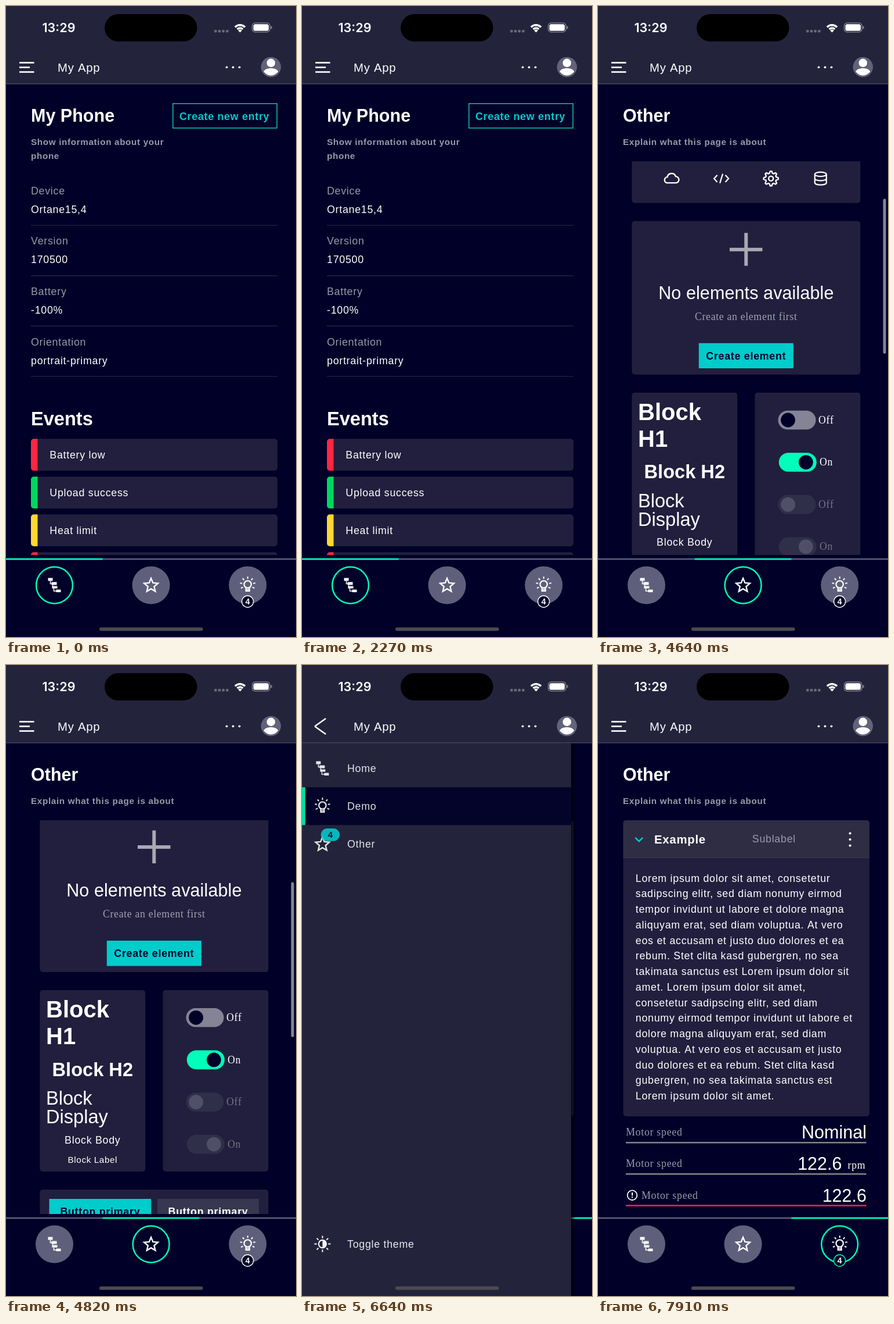
Recreate the animation shown at these times as an HTML page with a canvas. Size 500 by 1085 pixels, loop 8000 ms.

```html
<!DOCTYPE html>
<html lang="en">
<head>
<meta charset="utf-8">
<title>My App</title>
<style>
html, body { margin: 0; width: 100%; height: 100%; overflow: hidden; background: #000028; }
canvas { display: block; width: 100vw; height: 100vh; }
</style>
</head>
<body>
<canvas id="stage"></canvas>
<script>
const W = 500, H = 1085, LOOP = 8000, FPS = 11;
const canvas = document.getElementById('stage');
const ctx = canvas.getContext('2d');
const dpr = window.devicePixelRatio || 1;
canvas.width = W * dpr;
canvas.height = H * dpr;

const SANS = '"Liberation Sans", Arial, sans-serif';
const SERIF = '"Liberation Serif", "Times New Roman", serif';
const BG = '#000028', BAR = '#23233c', CARD = '#211f3d', WHITE = '#fff', SOFT = '#9999a9';
const TEAL = '#00ffb9', CYAN = '#00cccc', RED = '#ff2640', GREY = '#5f5f7b';
const BODY = 17.82, SMALL = 15.27, LARGE = 20.36, TITLE = 30.53;

// ---------- helpers ----------
const clamp = v => Math.min(1, Math.max(0, v));
const ramp = (v, a, b) => clamp((v - a) / (b - a));
const smooth = p => p * p * (3 - 2 * p);
const easeOut = p => 1 - (1 - p) ** 3;
const mix = (a, b, p) => a + (b - a) * p;

function rect(x, y, w, h, color, r = 0) {
  ctx.fillStyle = color;
  ctx.beginPath();
  ctx.roundRect(x, y, w, h, r);
  ctx.fill();
}

function disc(x, y, r, fill, stroke, width = 2) {
  ctx.beginPath();
  ctx.arc(x, y, r, 0, 7);
  if (fill) { ctx.fillStyle = fill; ctx.fill(); }
  if (stroke) { ctx.strokeStyle = stroke; ctx.lineWidth = width; ctx.stroke(); }
}

function line(x1, y1, x2, y2, color = WHITE, width = 2.6) {
  ctx.strokeStyle = color;
  ctx.lineWidth = width;
  ctx.beginPath();
  ctx.moveTo(x1, y1);
  ctx.lineTo(x2, y2);
  ctx.stroke();
}

function text(str, x, y, { size = BODY, color = WHITE, weight = 400, align = 'left', font = SANS, gap = 0.73 } = {}) {
  ctx.font = `${weight} ${size}px ${font}`;
  ctx.letterSpacing = gap + 'px';
  ctx.textAlign = align;
  ctx.fillStyle = color;
  ctx.fillText(str, x, y);
}

function at(x, y, draw) {
  ctx.save();
  ctx.translate(x, y);
  draw();
  ctx.restore();
}

function clipTo(x, y, w, h, draw) {
  ctx.save();
  ctx.beginPath();
  ctx.rect(x, y, w, h);
  ctx.clip();
  draw();
  ctx.restore();
}

function faded(alpha, draw) {
  if (alpha <= 0) return;
  ctx.save();
  ctx.globalAlpha *= alpha;
  draw();
  ctx.restore();
}

// ---------- icons, centred on 0,0 ----------
function stroke(d, width = 2.4, color = WHITE) {
  ctx.strokeStyle = color;
  ctx.lineWidth = width;
  ctx.stroke(new Path2D(d));
}

function fill(d, color = WHITE) {
  ctx.fillStyle = color;
  ctx.fill(new Path2D(d));
}

function rays(first, last, step, r1, r2) {
  for (let a = first; a <= last; a += step) {
    const c = Math.cos(a * Math.PI / 180), s = Math.sin(a * Math.PI / 180);
    line(c * r1, s * r1, c * r2, s * r2, WHITE, 2);
  }
}

function polygon(n, radius, turn = -Math.PI / 2) {
  ctx.beginPath();
  for (let i = 0; i < n; i++) {
    const a = turn + i * 2 * Math.PI / n, r = radius(i);
    ctx.lineTo(r * Math.cos(a), r * Math.sin(a));
  }
  ctx.closePath();
  ctx.strokeStyle = WHITE;
  ctx.lineWidth = 2.4;
  ctx.stroke();
}

const icons = {
  tree() {
    fill('M-11-12h8v5h-8zM-5-5h9v5h-9zM-4 2h9v4h-9zM3 8h8v4.5h-8z');
    stroke('M-7-7v5h3M-3 0v4M-1 6v4.5h5', 1.5);
  },
  star() { at(0, 1, () => polygon(10, i => i % 2 ? 5.6 : 12.4)); },
  bulb() {
    at(0, -1, () => { disc(0, 0, 6.2, null, WHITE, 2.3); rays(-210, 30, 40, 9.6, 13.4); });
    stroke('M-3 4.5v6h6v-6M-3 8h6', 2.2);
  },
  theme() {
    disc(0, 0, 6.6, null, WHITE, 2.2);
    fill('M0-6.6A6.6 6.6 0 0 1 0 6.6z');
    rays(0, 315, 45, 9.8, 14);
  },
  menu() { stroke('M-13.5-8.5h27M-13.5 0h18M-13.5 8.5h27'); },
  rocket() {
    stroke('M-5 2Q-1-9 11-10Q10 1-2 6zM-4-3l-6 1 3-6 7-1M3 3l0 7-6 3 0-7', 2);
    disc(4, -4, 2.2, WHITE);
    stroke('M-6 5l-6 6M-9 3l-3 3M-4 8l-3 4', 1.8);
  },
  calendar() {
    stroke('M-11-10.5h22v21h-22z');
    stroke('M-11-5.5h22', 3);
    stroke('M-6.5 1h13M-6.5 6h13', 2.6);
    stroke('M-3.3-1v9M3.3-1v9', 2, CARD);
  },
  layout() {
    stroke('M3-10.5h-14v21h22v-12h-22M0-10.5v21');
    stroke('M5.5-10.5h5.5v5h-5.5z');
  },
  store() {
    stroke('M-9-12q-7 9 3 12M-6-5v5h-5', 2);
    at(6, 4, () => icons.stack(7, 9));
  },
  bars() { for (let x = -12; x <= 12; x += 4) line(x, -11, x, 11, WHITE, 2); },
  battery() {
    stroke('M-12.5-7.5h23v15h-23z');
    fill('M-9.5-4.5h17v9h-17zM11-3.5h3v7h-3z');
  },
  clock() {
    disc(0, 0, 12.5, null, WHITE, 2.4);
    stroke('M0-7.5v8l4 4.5');
  },
  cloud() { stroke('M-7 7.5a5 5 0 0 1-.5-10a7.5 7.5 0 0 1 14.5-1a5.5 5.5 0 0 1 0 11z'); },
  code() { stroke('M-7-6l-5.5 6 5.5 6M7-6l5.5 6-5.5 6M2.5-8l-5 16', 2.2); },
  gear() {
    polygon(32, i => i % 4 < 2 ? 12.6 : 9.4, -Math.PI / 2 - Math.PI / 32);
    disc(0, 0, 4, null, WHITE, 2.4);
  },
  stack(w = 10, h = 11) {
    const k = h / 3;
    stroke(`M${-w} ${-h + k}a${w} ${k} 0 0 1 ${2 * w} 0a${w} ${k} 0 0 1 ${-2 * w} 0v${2 * h - 2 * k}a${w} ${k} 0 0 0 ${2 * w} 0v${-2 * h + 2 * k}M${-w} 0a${w} ${k} 0 0 0 ${2 * w} 0`, 2.2);
  }
};
const icon = (name, x, y) => at(x, y, () => icons[name]());

// ---------- frame of the app ----------
function statusBar() {
  text('13:29', 91, 45.3, { size: 21.6, weight: 600, align: 'center', font: 'Inter, sans-serif', gap: 0 });
  rect(170, 14, 159.5, 47, '#000', 23.5);
  for (let i = 0; i < 4; i++) rect(359 + i * 6.7, 41, 4.6, 4.6, '#6a697c', 1.5);
  ctx.strokeStyle = WHITE;
  ctx.lineWidth = 3.4;
  for (const r of [6.6, 11.8]) {
    ctx.beginPath();
    ctx.arc(403.5, 44.5, r, -Math.PI * 0.76, -Math.PI * 0.24);
    ctx.stroke();
  }
  at(403.5, 45.5, () => fill('M0 0l-3.4-3.6q3.4-2.6 6.8 0z'));
  ctx.beginPath();
  ctx.roundRect(424.5, 29.2, 30.5, 15.6, 5);
  ctx.strokeStyle = '#8c8b9b';
  ctx.lineWidth = 1.3;
  ctx.stroke();
  rect(426.5, 31.2, 26.5, 11.6, WHITE, 3.4);
  rect(456.5, 34.5, 2, 5, '#8c8b9b', 1);
}

function menuButton({ morph, mid, held }) {
  if (held) rect(13, 84, 44, 43, '#35354a');
  // each row: x1, y1, x2, y2 of the upper arm; the lower arm mirrors it
  const poses = [[23, -8, 48.5, -8], [23, -1.4, 48.5, 1.4], [22, 0, 41, -13.5]];
  const i = morph < 0.52 ? 0 : 1;
  const p = i ? ramp(morph, 0.52, 1) : ramp(morph, 0, 0.52);
  const [x1, y1, x2, y2] = poses[i].map((v, n) => mix(v, poses[i + 1][n], p));
  faded(mid, () => line(mix(23, 27, morph), 105.5, 41, 105.5));
  line(x1, 105.5 + y1, x2, 105.5 + y2);
  line(x1, 105.5 - y1, x2, 105.5 - y2);
}

function header(button) {
  rect(0, 0, W, 134, BAR);
  rect(0, 133, W, 1.6, '#46465a');
  statusBar();
  menuButton(button);
  text('My App', 89, 112.5, { size: LARGE });
  for (const x of [380.5, 391.5, 402.5]) disc(x, 105.3, 1.9, WHITE);
  disc(456.8, 105, 17.3, '#62627a');
  disc(456.8, 97.8, 7.3, WHITE);
  at(456.8, 113, () => fill('M-12.5 0C-10-8 10-8 12.5 0Q6 7 0 6.4Q-6 7-12.5 0z'));
}

function tabBar(active, slide) {
  rect(0, 944, W, 141, BG);
  rect(0, 949.8, W, 2.4, GREY);
  rect(slide * W / 3, 949.8, W / 3, 2.4, TEAL);
  ['tree', 'star', 'bulb'].forEach((name, i) => {
    const x = 83.5 + i * 166.6;
    if (i === active) disc(x, 996, 31.4, BG, TEAL, 2.5);
    else disc(x, 996, 32.5, GREY);
    icon(name, x, 995.5);
  });
  disc(416.6, 1024, 10, BG, active === 2 ? TEAL : WHITE, 1.4);
  text('4', 416.6, 1029, { size: 14, weight: 700, align: 'center', gap: 0 });
}

function heading(title, lines) {
  text(title, 43, 199, { size: TITLE, weight: 700, gap: 0 });
  lines.forEach((s, i) => text(s, 43, 239 + i * 24.2, { size: SMALL, weight: 700, color: SOFT, gap: 0.64 }));
}

function scrollbar(x, top, range, offset) {
  const view = 944 - top, k = view / (view + range);
  rect(x, top + offset * k + 3, 5, view * k - 3, '#858596', 2.5);
}

// ---------- pages ----------
const rows = [['Device', 'Ortane15,4'], ['Version', '170500'], ['Battery', '-100%'], ['Orientation', 'portrait-primary']];
const events = ['Battery low', 'Upload success', 'Heat limit'];
const eventColors = [RED, '#00d75f', '#ffd732'];
const HOME_RANGE = 195;

function homePage(scroll, bar) {
  heading('My Phone', ['Show information about your', 'phone']);
  ctx.strokeStyle = '#10b5b0';
  ctx.lineWidth = 1.6;
  ctx.strokeRect(287.8, 167.8, 179.4, 42);
  text('Create new entry', 299, 195.5, { weight: 700, color: CYAN });
  clipTo(0, 291, W, 653, () => {
    at(0, -scroll, () => {
      rows.forEach(([label, value], i) => {
        const y = i * 86.6;
        text(label, 43, 323.7 + y, { color: SOFT });
        text(value, 43, 355.7 + y);
        rect(43, 376.4 + y, 425, 1.4, '#232341');
      });
      text('Events', 43, 720.7, { size: 32.6, weight: 700, gap: 0 });
      for (let i = 0; i < 6; i++) {
        const y = 744.3 + i * 65;
        rect(43, y, 425, 54.6, CARD, 5);
        rect(43, y, 11.5, 54.6, eventColors[i % 3], [5, 0, 0, 5]);
        text(events[i % 3], 75.3, y + 33.2);
      }
    });
    if (bar) scrollbar(476, 291, HOME_RANGE, scroll);
  });
}

const gridIcons = ['menu', 'rocket', 'calendar', 'layout', 'store', 'bars', 'battery', 'clock', 'cloud', 'code', 'gear', 'stack'];
const card = (x, y, w, h) => rect(x, y, w, h, CARD, 5);

function toggle(y, on, disabled) {
  const x = on ? 311.8 : 310.5;
  rect(x, y, 65, 32.6, disabled ? '#302f4a' : on ? TEAL : '#858496', 16.3);
  disc(on ? 358.4 : 327.6, y + 16.3, 12.4, disabled ? '#514f68' : BG);
  text(on ? 'On' : 'Off', on ? 382 : 380, y + 22, { font: SERIF, color: disabled ? '#737286' : WHITE });
}

function button(label, x, y, w, color, ink) {
  rect(x, y, w, 43.4, color);
  text(label, x + w / 2, y + 28.2, { weight: 700, align: 'center', color: ink });
}

function otherPage(scroll, bar) {
  heading('Other', ['Explain what this page is about']);
  clipTo(0, 267, W, 677, () => {
    at(0, -scroll, () => {
      card(58.4, 282, 394, 211);
      gridIcons.forEach((name, i) => icon(name, 127 + (i % 4) * 85.6, 325 + Math.floor(i / 4) * 63));

      card(58.4, 524, 394, 264);
      rect(227, 570, 56.5, 6, '#a9a8b4');
      rect(252.3, 544.5, 6, 56.5, '#a9a8b4');
      text('No elements available', 255.3, 658, { size: TITLE, align: 'center', gap: 0.1 });
      text('Create an element first', 255.3, 694, { font: SERIF, align: 'center', color: '#a3a2b0', gap: 0.65 });
      button('Create element', 173.8, 734, 163, CYAN, BG);

      card(58.4, 819, 181.8, 312);
      const big = { size: 40, weight: 700, gap: 0 }, display = { size: 32.6, gap: 0 };
      text('Block', 69, 866.3, big);
      text('H1', 69, 912, big);
      text('Block H2', 149.3, 966.7, { size: 32.6, weight: 700, align: 'center', gap: 0 });
      text('Block', 69, 1016, display);
      text('Display', 69, 1048, display);
      text('Block Body', 149.3, 1082.6, { align: 'center' });
      text('Block Label', 149.3, 1116.4, { size: SMALL, align: 'center', gap: 0.6 });

      card(270.4, 819, 182, 312);
      for (let i = 0; i < 4; i++) toggle(850 + i * 72.6, i % 2 === 1, i > 1);

      card(58.4, 1162, 394, 120);
      button('Button primary', 74.5, 1178, 175.7, CYAN, BG);
      button('Button primary', 261, 1178, 175, '#383750', WHITE);
    });
    if (bar) scrollbar(491.5, 267, 1025, scroll);
  });
}

const lorem = `Lorem ipsum dolor sit amet, consetetur
sadipscing elitr, sed diam nonumy eirmod
tempor invidunt ut labore et dolore magna
aliquyam erat, sed diam voluptua. At vero
eos et accusam et justo duo dolores et ea
rebum. Stet clita kasd gubergren, no sea
takimata sanctus est Lorem ipsum dolor sit
amet. Lorem ipsum dolor sit amet,
consetetur sadipscing elitr, sed diam
nonumy eirmod tempor invidunt ut labore et
dolore magna aliquyam erat, sed diam
voluptua. At vero eos et accusam et justo
duo dolores et ea rebum. Stet clita kasd
gubergren, no sea takimata sanctus est
Lorem ipsum dolor sit amet.`.split('\n');

function field(y, value, { unit, error } = {}) {
  text('Motor speed', error ? 75 : 48, y - 12, { font: SERIF, color: SOFT });
  text(value, unit ? 420.5 : 463, y - 7, { size: TITLE, align: 'right', gap: 0 });
  if (unit) text(unit, 430.5, y - 9, { font: SERIF });
  if (error) {
    disc(59, y - 17.8, 8.3, null, WHITE, 1.8);
    rect(58, y - 22.5, 2, 5.5, WHITE);
    rect(58, y - 15.5, 2, 2, WHITE);
  }
  rect(48, y - 1.3, 414.6, 2.5, error ? RED : '#858488');
}

function demoPage(pressed) {
  heading('Other', ['Explain what this page is about']);
  card(43.5, 267, 424.5, 509);
  if (pressed) {
    rect(43.5, 267, 424.5, 64.5, '#2e2d44', [5, 5, 0, 0]);
    rect(43.5, 330.5, 424.5, 1.2, '#3a394e');
  }
  at(70.7, 300, () => stroke('M-6.5-3.2l6.5 6.4 6.5-6.4', 2.5, CYAN));
  text('Example', 97, 307.2, { size: LARGE, weight: 700 });
  text('Sublabel', 265.8, 305, { color: SOFT });
  for (const y of [289.5, 300, 310.5]) disc(434.6, y, 2.1, WHITE);
  lorem.forEach((s, i) => text(s, 64.8, 372.7 + i * 26.75));
  field(821.2, 'Nominal');
  field(875.2, '122.6', { unit: 'rpm' });
  field(929.5, '122.6', { error: true });
}

// ---------- side menu ----------
function drawer(width, closing) {
  if (width <= 0) return;
  const shade = ctx.createLinearGradient(width, 0, width + 8, 0);
  shade.addColorStop(0, 'rgba(0,0,0,.75)');
  shade.addColorStop(1, 'rgba(0,0,0,0)');
  ctx.fillStyle = shade;
  ctx.fillRect(width, 135, 8, 950);
  clipTo(0, 134.5, width, 951, () => {
    rect(0, 134, W, 951, BAR);
    faded(1 - ramp(closing, 0, 0.6), () => {
      rect(0, 210.3, W, 65, BG);
      rect(0, 210.3, 5.6, 65, TEAL);
      ['tree', 'bulb', 'star'].forEach((name, i) => {
        icon(name, 35.3, 177.5 + i * 65);
        text(['Home', 'Demo', 'Other'][i], 78, 183.8 + i * 65);
      });
      rect(32.6, 281, 32.3, 21.8, CYAN, 10.9);
      text('4', 48.7, 297, { size: SMALL, weight: 700, align: 'center', color: BG, gap: 0 });
    });
    faded(1 - closing * 0.65, () => icon('theme', 35.3, 995.5));
    faded(1 - ramp(closing, 0, 0.75), () => text('Toggle theme', 78, 1001.5));
  });
}

// ---------- timeline, counted in ticks of 1/11 s ----------
const flick = (k, start, length) => easeOut(ramp(k, start - 0.7, start - 0.7 + length));
const within = (k, a, b) => k >= a && k < b;

function render(ms) {
  const k = Math.floor(ms * FPS / 1000 + 0.06);
  ctx.setTransform(dpr, 0, 0, dpr, 0, 0);
  rect(0, 0, W, H, BG);

  if (k < 35) {
    const scroll = HOME_RANGE * (flick(k, 9, 2.7) - flick(k, 21, 3.7));
    homePage(scroll, within(k, 9, 12) || within(k, 21, 25));
  } else if (k < 73) {
    faded(ramp(k, 34, 37), () => otherPage(260 * flick(k, 51, 2.7), within(k, 51, 54)));
  } else {
    demoPage(k >= 87);
  }

  const tab = k < 34 ? 0 : k < 73 ? 1 : 2;
  tabBar(tab, k < 73 ? smooth(ramp(k, 33, 37)) : 2);

  const opened = smooth(ramp(k, 60.79, 67));
  const closed = smooth(ramp(k, 72.4, 76.05));
  drawer(W * (opened - closed), closed);

  header({
    morph: k < 73 ? opened : 1 - smooth(ramp(k, 75, 78)),
    mid: k < 73 ? 1 - opened : ramp(k, 74.3, 76.3),
    held: within(k, 61, 66)
  });
  rect(161, 1068.5, 178.5, 6, '#4a4a50', 3);
}

function loop(now) {
  render(now % LOOP);
  requestAnimationFrame(loop);
}
requestAnimationFrame(loop);
</script>
</body>
</html>
```
